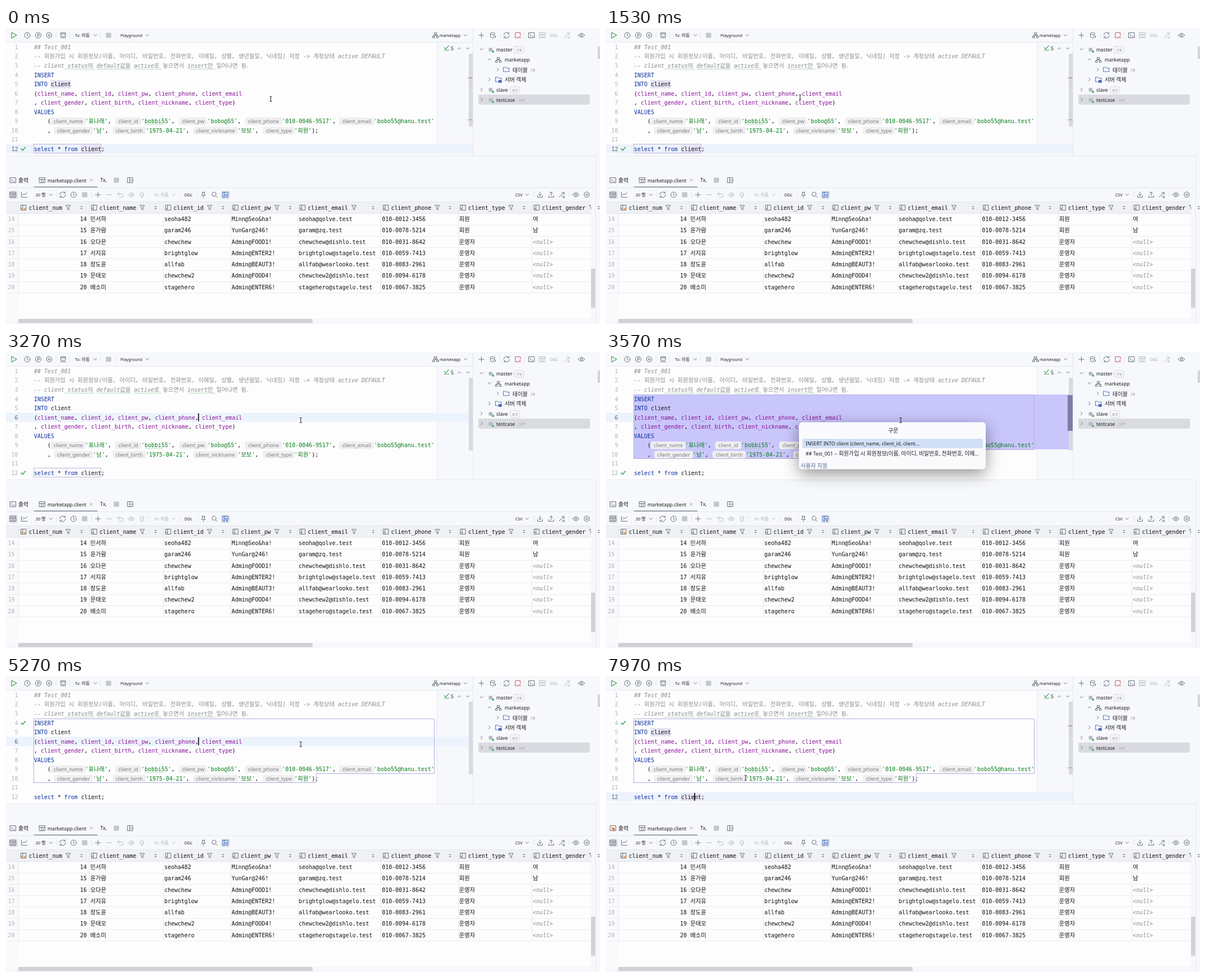
An HTML page for the animation above (8000 ms loop, 1059 by 529 pixels).

```html
<!DOCTYPE html>
<html lang="ko">
<head>
<meta charset="utf-8">
<title>SQL console</title>
<style>
html, body { margin: 0; width: 100%; height: 100%; overflow: hidden; background: #f7f8fb; }
svg { display: block; }
text { white-space: pre; font: 8.7px "Noto Sans", "Noto Sans CJK KR", sans-serif; fill: #1c1d22; }
.ko { font-size: 1.13em; font-style: normal; }
.m { font: 9.95px "DejaVu Sans Mono", "Noto Sans CJK KR", monospace; fill: #101014; }
.m .ko { font-size: 1.04em; }
.t { font-size: 7.2px; }
.h { font-size: 9.2px; fill: #7c7c80; }
.k { fill: #0a2f9e; }
.f { fill: #871094; }
.s { fill: #067d17; }
.c { fill: #8c8c8c; font-style: italic; }
.n { fill: #aeb3c2; }
.cur { fill: #5f6475; }
.dim { fill: #a4a8b4; }
.end { text-anchor: end; }
.mid { text-anchor: middle; }
.ico { fill: none; stroke: #6c707e; stroke-linecap: round; stroke-linejoin: round; }
.pop { filter: drop-shadow(0 8px 14px rgba(0, 0, 0, .42)); }
.link { fill: #4d6191; }
#mouse { animation: roam 8s linear infinite; }
@keyframes roam {
  0%, 5% { transform: translate(472px, 127px); animation-timing-function: ease-in-out; }
  18.75%, 27.75% { transform: translate(346px, 123.5px); animation-timing-function: ease-in; }
  32.5% { transform: translate(500px, 123px); animation-timing-function: ease-out; }
  36.25%, 73.75% { transform: translate(525.5px, 122px); animation-timing-function: ease-in-out; }
  85.375% { transform: translate(408px, 141.5px); animation-timing-function: ease-in-out; }
  93.125%, 95.625% { transform: translate(159px, 215px); animation-timing-function: ease-out; }
  99.625%, 100% { transform: translate(249px, 182px); }
}
</style>
</head>
<body>
<svg id="stage" width="1059" height="529" viewBox="0 0 1059 529"></svg>
<script>
const LOOP = 8000;
const ring = r => `M${r} 0A${r} ${r} 0 1 1-${r} 0 ${r} ${r} 0 1 1 ${r} 0`;
const SHAPES = {
  play: 'M-4-5L5 0-4 5Z',
  clock: ring(5) + 'M0-3V0L2 1.5',
  param: ring(5) + 'M-1 2.7V-2.5H.7A1.5 1.5 0 0 1 .7 .6H-1',
  gear: 'M0-5.2L4.5-2.6V2.6L0 5.2-4.5 2.6V-2.6Z' + ring(1.7),
  screen: 'M-4-4.5H4V2H-4ZM-4.5 4.5H4.5M-4-2.5H4',
  down: 'M-2.6-1.3L0 1.3 2.6-1.3',
  up: 'M-2.6 1.3L0-1.3 2.6 1.3',
  right: 'M-1.3-2.6L1.3 0-1.3 2.6',
  plus: 'M-4.5 0H4.5M0-4.5V4.5',
  minus: 'M-4.5 0H4.5',
  close: 'M-2-2L2 2M2-2L-2 2',
  sync: 'M-5 0A5 5 0 0 1 4-3M5 0A5 5 0 0 1-4 3M4.4-5.3V-2.8H2M-4.4 5.3V2.8H-2',
  db: 'M-4.5-3C-4.5-5.5 3-5.5 3-3S-4.5-.5-4.5-3V3Q-4 4.6-.5 4.8M3-3V-1M4.8 2.6A2 2 0 1 1 .8 2.6 2 2 0 1 1 4.8 2.6',
  stop: 'M1 4.5H-4.5V-4.5H4.5V0M2 2L5 5M5 2L2 5',
  table: 'M-5-4.5H5V4.5H-5ZM-5-1.5H5M-1.6-1.5V4.5M1.7-1.5V4.5',
  shell: 'M-5-4.5H5V4.5H-5ZM-3-2L-1 0-3 2M0 2H3',
  layout: 'M-4.5-4.5H4.5V4.5H-4.5ZM-1-4.5V4.5M-1 0H4.5',
  chart: 'M-5-4.5V4.5H5M-3 1L-.5-2 1.5 0 5-4',
  undo: 'M-2-4.5L-5-1.5-2 1.5M-5-1.5H2A3 3 0 0 1 2 4.5H-2',
  eye: 'M-5.5 0C-3-4.6 3-4.6 5.5 0 3 4.6-3 4.6-5.5 0Z' + ring(1.8),
  raise: 'M0-5L4-.5H1.8V4.5H-1.8V-.5H-4Z',
  pin: 'M-2.5-4.5H2.5M-1.7-4.5V-1L-3.5 1.2H3.5L1.7-1V-4.5M0 1.2V5',
  find: 'M3-1A3.7 3.7 0 1 1-4.4-1 3.7 3.7 0 1 1 3-1M2 2L4.8 4.8',
  filter: 'M-4.5-4.5H4.5V-2M-4.5-4.5V4.5H-1M-1.5-4.5V4.5M0 0H5.5L3.5 2.4V5L2 4V2.4Z',
  load: 'M0-5V1.5M-2.5-1L0 1.5 2.5-1M-4.5 1.5V4.5H4.5V1.5',
  unload: 'M0 1.5V-5M-2.5-2.5L0-5 2.5-2.5M-4.5 1.5V4.5H4.5V1.5',
  jump: 'M-5 4L4-4M0-4H4V0M0 4H5M3 2L5 4 3 6',
  funnel: 'M-4-4H4L1.2-.2V4L-1.2 3V-.2Z',
  sort: 'M-2-.9L0-3 2-.9ZM-2 .9L0 3 2 .9Z',
  col: 'M-4.5-4.5H4.5V4.5H-4.5ZM-1.5-4.5V4.5M-4.5 1.5H-1.5',
  schema: 'M-2-4.5H2V-1.5H-2ZM-5 1.5H-2V4.5H-5ZM2 1.5H5V4.5H2ZM0-1.5V0M-3.5 1.5V0H3.5V1.5',
  folder: 'M-5-4H-1.5L0-2.5H5V4H-5Z',
  check: 'M-3.5 0L-1 2.7 4-3'
};
const esc = s => s.replace(/&/g, '&amp;').replace(/</g, '&lt;').replace(/>/g, '&gt;');
const ko = s => s.replace(/[가-힣]+/g, '<tspan class="ko">$&</tspan>');
const raw = (x, y, s, cls) => `<text x="${x}" y="${y}" class="${cls}">${ko(s)}</text>`;
const text = (x, y, s, cls = '') => raw(x, y, esc(s), cls);
const box = (x1, y1, x2, y2, fill, r = 0) =>
  `<rect x="${x1}" y="${y1}" width="${x2 - x1}" height="${y2 - y1}" rx="${r}" fill="${fill}"/>`;
const line = (d, color) => `<path d="${d}" fill="none" stroke="${color}"/>`;
const icon = (name, x, y, color = '#6c707e', w = 1) =>
  `<path class="ico" d="${SHAPES[name]}" transform="translate(${x} ${y})" style="stroke:${color};stroke-width:${w}"/>`;
const icons = (y, list) => list.map(([name, x, color]) => icon(name, x, y, color)).join('');
// Shown only during the given on/off times in ms.
const during = (times, body) => `<g data-on="${times}">${body}</g>`;
const GRAY = '#b6b9c3', GREEN = '#3fa354', RULE = '#e6e7ee', BLUE = '#4a6fc4';

const rowY = n => 37.9 + 16.55 * (n - 1);
const paint = s => s.replace(/\b(INSERT|INTO|VALUES|select|from)\b|client_\w+|'[^']*'/g,
  (w, key) => `<tspan class="${key ? 'k' : w[0] === "'" ? 's' : 'f'}">${w}</tspan>`);
const code = (n, x, s) => raw(x, rowY(n), paint(s), 'm');
const lineNo = (n, cls) => text(21.5, rowY(n), '' + n, 'm end ' + cls);
const band = n => box(0, rowY(n) - 12, 832, rowY(n) + 4.5, '#edf3fd') + lineNo(n, 'cur');
const hint = (n, x1, x2, s) => box(x1, rowY(n) - 10.2, x2, rowY(n) + 3.2, '#efeff1', 3) +
  text((x1 + x2) / 2, rowY(n) - .2, s, 'h mid');
const wave = (x1, x2, y) => {
  let d = `M${x1} ${y}`;
  for (let x = x1; x < x2; x += 4) d += 'q1-2 2 0t2 0';
  return `<path d="${d}" fill="none" stroke="#8cc28f" stroke-width=".8"/>`;
};
const caret = (n, x) => box(x - .8, rowY(n) - 11, x + .8, rowY(n) + 3, '#000');

function editor() {
  let s = box(0, 25, 768, 228, '#fdfdfe') + line('M0 25.5H832M768.5 26V228M0 228.5H1051M832.5 0V228', RULE);
  for (let n = 1; n <= 12; n++) s += lineNo(n, 'n');
  s += during('0 2120 7600 8000', band(12)) + during('2120 7600', band(6));
  s += during('0 2120 7800 8000', box(79, 93, 116, 108, '#e5e3f3') + box(133, 209, 170, 223, '#e5e3f3'));
  s += during('3420 4500', '<path d="M50 76H832V174H553V190H50Z" fill="#c9c6fc"/>');
  s += box(825, 46, 832, 176, '#d9dadf');
  s += during('0 2120 7800 8000', box(823, 88.5, 832, 89.8, '#b27fb8') + box(823, 163.4, 832, 164.6, '#a3a0dc'));
  s += during('3420 4500', box(823, 77, 832, 141, '#7d7ca6'));

  s += text(50, rowY(1), '## Test_001', 'm c');
  s += text(50, rowY(2), '-- 회원가입 시 회원정보(이름, 아이디, 비밀번호, 전화번호, 이메일, 성별, 생년월일, 닉네임) 저장 -> 계정상태 active DEFAULT', 'm c');
  s += text(50, rowY(3), '-- client_status의 default값을 active로 놓으면서 insert만 일어나면 됨.', 'm c');
  s += wave(110, 155, 73.5) + wave(162, 222, 73.5) + wave(229, 274, 73.5) + wave(325, 370, 73.5) + wave(248, 280, 172.5);
  s += code(4, 50, 'INSERT') + code(5, 50, 'INTO client');
  s += code(6, 50, '(client_name, client_id, client_pw, client_phone, client_email');
  s += code(7, 50, ', client_gender, client_birth, client_nickname, client_type)') + code(8, 50, 'VALUES');
  s += code(9, 74, '(') + code(9, 141, "'표나래',") + code(9, 241, "'bobbi55',") + code(9, 359, "'bobo@55',");
  s += code(9, 492, "'010-0046-9517',") + code(9, 656, "'bobo55@hanu.test'");
  s += hint(9, 80, 142, 'client_name') + hint(9, 195, 241, 'client_id') + hint(9, 309, 359, 'client_pw');
  s += hint(9, 426, 492, 'client_phone') + hint(9, 594, 656, 'client_email');
  s += code(10, 74, ',') + code(10, 155, "'남',") + code(10, 249, "'1975-04-21',") + code(10, 413, "'보보',") + code(10, 514, "'회원');");
  s += hint(10, 86, 155, 'client_gender') + hint(10, 190, 249, 'client_birth');
  s += hint(10, 334, 413, 'client_nickname') + hint(10, 458, 515, 'client_type');
  s += code(12, 50, 'select * from client;');

  s += during('0 3420', line('M49.5 207.5H169.5V223.5H49.5Z', '#b9b4d6'));
  s += during('3420 8000', line('M49.5 76.5H763.5V174.5H553V190.5H49.5Z', '#b2adde'));
  s += during('0 4600', icon('check', 30.5, 216, GREEN, 1.6)) + during('4600 8000', icon('check', 30.5, 84, GREEN, 1.6));
  s += during('2120 2620 3120 3420 4500 4730 5230 5730 6230 6730 7230 7600', caret(6, 343.3));
  s += during('7600 8000', caret(12, 158));
  s += during('5700 7600', '<circle cx="60.3" cy="96.5" r="4" fill="#f5a81c"/>' + box(58.5, 100.8, 62, 102.5, '#8a6a3a'));
  s += icon('check', 785, 35, GREEN, 1.2) + line('M781 39.5H790', GREEN) + text(793, 40, '5');
  return s + icons(36.5, [['up', 808], ['down', 823.5]]);
}

function topBar() {
  return icon('play', 14, 13, GREEN, 1.2) +
    icons(13, [['clock', 38], ['param', 57.5], ['gear', 77], ['screen', 102], ['down', 159], ['down', 252],
      ['schema', 766], ['down', 819.5], ['plus', 847.5], ['db', 868], ['sync', 892.5], ['stop', 912.5, '#c94f62'],
      ['shell', 937], ['table', 956, GRAY], ['jump', 1000, GRAY], ['eye', 1026]]) +
    line('M89.5 8V18M113.5 8V18M168.5 8V18M195.5 8V18M881.5 8V18M924.5 8V18', RULE) +
    box(178, 8.5, 187.5, 17.5, '#c4c6cd', 1) + text(123, 15.7, 'Tx: 자동', 't') + text(204, 15.7, 'Playground', 't') +
    text(773, 15.7, 'marketapp', 't') + text(970, 16.2, 'DDL', 't dim');
}

function tree() {
  const node = (y, name, tag, tagX) =>
    `<circle cx="864" cy="${y - .5}" r="3.6" fill="#b4b9c5"/><circle cx="868.3" cy="${y + 3.2}" r="1.9" fill="#45b053"/>` +
    `<rect x="${tagX - 3}" y="${y - 6}" width="17" height="12" rx="3" fill="none" stroke="#d3d5dc"/>` +
    text(874, y + 3.2, name) + text(tagX, y + 2.8, tag, 't c');
  return box(842, 119, 1041, 137, '#dadbe1', 3) + box(1055, 33, 1059, 55, '#d2d3d8') +
    node(39, 'master', '1/4', 909) + node(111, 'slave', '0/3', 902) + node(129, 'testcase', '1/7', 914) +
    icon('down', 848, 38) + icon('down', 862, 56) + icon('right', 877, 74) + icon('right', 862, 92) +
    icon('right', 848, 110) + icon('right', 848, 128) +
    icon('schema', 878, 57) + icon('folder', 892, 74, BLUE) + icon('folder', 878, 92, BLUE) + box(878, 93, 884, 98, BLUE, 1) +
    text(889, 60.4, 'marketapp') + text(903, 78.6, '테이블') + text(935, 78, '18', 't c') + text(889, 96.4, '서버 객체');
}

const COLS = [['num', 22, 148], ['name', 148, 280], ['id', 280, 400], ['pw', 400, 520], ['email', 519.5, 668],
  ['phone', 668, 805], ['type', 805.5, 937], ['gender', 937, 1070]];
const ROWS = `민서하 seoha482 Minn@Seo&ha! seoha@qolve.test 010-0012-3456 회원 여
윤가람 garam246 YunGar@246! garam@zq.test 010-0078-5214 회원 남
오다은 chewchew Admin@FOOD1! chewchew@dishlo.test 010-0031-8642 운영자 <null>
서지유 brightglow Admin@ENTER2! brightglow@stagelo.test 010-0059-7413 운영자 <null>
장도윤 allfab Admin@BEAUT3! allfab@wearlooko.test 010-0083-2961 운영자 <null>
문태오 chewchew2 Admin@FOOD4! chewchew2@dishlo.test 010-0094-6178 운영자 <null>
배소미 stagehero Admin@ENTER6! stagehero@stagelo.test 010-0067-3825 운영자 <null>`.split('\n').map(r => r.split(' '));

function results() {
  let s = during('0 5500', icon('shell', 12.5, 272)) +
    during('5500 8000', icon('shell', 12.5, 272, '#8d6a62') + '<circle cx="13.5" cy="273.5" r="2.4" fill="#e07a45"/>');
  s += text(22, 275.8, '출력') + icon('table', 64.5, 272) + text(74, 276, 'marketapp.client') + icon('close', 152, 272, '#8a8e9a', .8);
  s += box(50, 283.3, 163, 285, '#9398a8') + text(168, 275, 'Tx') + box(177, 274, 178.5, 275.5, '#555');
  s += box(192, 267.5, 201.5, 276.5, '#c4c6cd', 1) + icon('layout', 221.5, 272);
  s += line('M0 285.5H1051', RULE);

  s += box(5, 291, 20.5, 305.5, '#dcdee5', 3) + box(383.5, 291, 399, 305.5, '#d9deea', 3);
  s += icons(298, [['table', 12.5], ['chart', 32.5], ['down', 80], ['sync', 101], ['clock', 120.5], ['plus', 164],
    ['minus', 184, GRAY], ['undo', 204, GRAY], ['eye', 223.5, GRAY], ['raise', 242.5, GRAY], ['down', 299, GRAY],
    ['pin', 352], ['find', 371.5], ['filter', 391, BLUE], ['down', 929], ['load', 952], ['unload', 972], ['jump', 991],
    ['eye', 1016], ['gear', 1035.5]]);
  s += box(135.5, 293.5, 145, 302.5, '#c4c6cd', 1) + text(53, 301, '20 행', 't') + text(264, 301, 'Tx: 자동', 't dim');
  s += text(318, 301, 'DDL', 't') + text(908, 301, 'CSV', 't');
  s += line('M90.5 293V303M152.5 293V303M253.5 293V303M309.5 293V303M341.5 293V303M941.5 293V303M1003.5 293V303', RULE);

  s += box(0, 311, 1043, 331.5, '#f0f1f5') + box(22, 331.5, 1043, 519, '#fdfdfe') + box(0, 331.5, 22, 519, '#fafafc');
  COLS.forEach(([name, x, next], i) => {
    const label = 'client_' + name, tx = x + 18.5;
    s += icon('col', x + 9.3, 321) + text(tx, 324.6, label, 'm') + icon('funnel', tx + label.length * 6 + 10.5, 321);
    if (i === 0) s += '<circle cx="34" cy="323.5" r="2" fill="#e9a23b"/>';
    s += `<path d="${SHAPES.sort}" transform="translate(${next - 13.3} 321)" fill="#6c707e"/>`;
    s += line(`M${Math.round(x) + .5} 311V473`, RULE);
  });
  ROWS.forEach((cells, r) => {
    const y = 345.2 + 20.25 * r;
    s += text(3.5, y, '' + (14 + r), 'm n') + text(144, y, '' + (14 + r), 'm end');
    cells.forEach((v, c) => s += text(COLS[c + 1][1] + 2.2, y, v, v === '<null>' ? 'm c' : 'm'));
    s += line(`M0 ${Math.round(y + 6.3) + .5}H1043`, '#ebecf1');
  });
  return s + line('M0 310.5H1043M0 331.5H1043', RULE) + box(1043, 306, 1051, 519, '#f7f8fb') +
    line('M1051.5 228V529', RULE) + box(1043, 430, 1050.5, 500, '#d2d3d7') +
    box(22, 520, 546.5, 527.5, '#d0d1d5');
}

function popup() {
  return during('3420 4500',
    `<g class="pop">${box(344, 125.5, 677, 209.5, '#fafafd', 6)}</g>` +
    text(512, 144.3, '구문', 'mid') + box(350, 155, 672, 172, '#d1e0f6', 3) +
    text(356, 167, 'INSERT INTO client (client_name, client_id, client...') +
    text(356, 185.2, '## Test_001 -- 회원가입 시 회원정보(이름, 아이디, 비밀번호, 전화번호, 이메...') +
    text(347, 206.5, '사용자 지정', 'link'));
}

const mouse = '<path id="mouse" d="M-2-4.5Q0-4.5 0-3.5Q0-4.5 2-4.5M0-3.5V3.5M-2 4.5Q0 4.5 0 3.5Q0 4.5 2 4.5" fill="none" stroke="#111"/>';
document.getElementById('stage').innerHTML =
  box(0, 0, 1059, 529, '#f7f8fb') + editor() + topBar() + tree() + results() + popup() + mouse;

const sheet = document.createElement('style');
document.querySelectorAll('[data-on]').forEach((el, i) => {
  const steps = el.dataset.on.split(' ').map((ms, j) => `${ms / LOOP * 100}%{opacity:${1 - j % 2}}`);
  sheet.textContent += `@keyframes cue${i}{0%{opacity:0}${steps.join('')}}`;
  el.style.animation = `cue${i} ${LOOP}ms step-end infinite`;
});
document.head.append(sheet);
</script>
</body>
</html>
```
